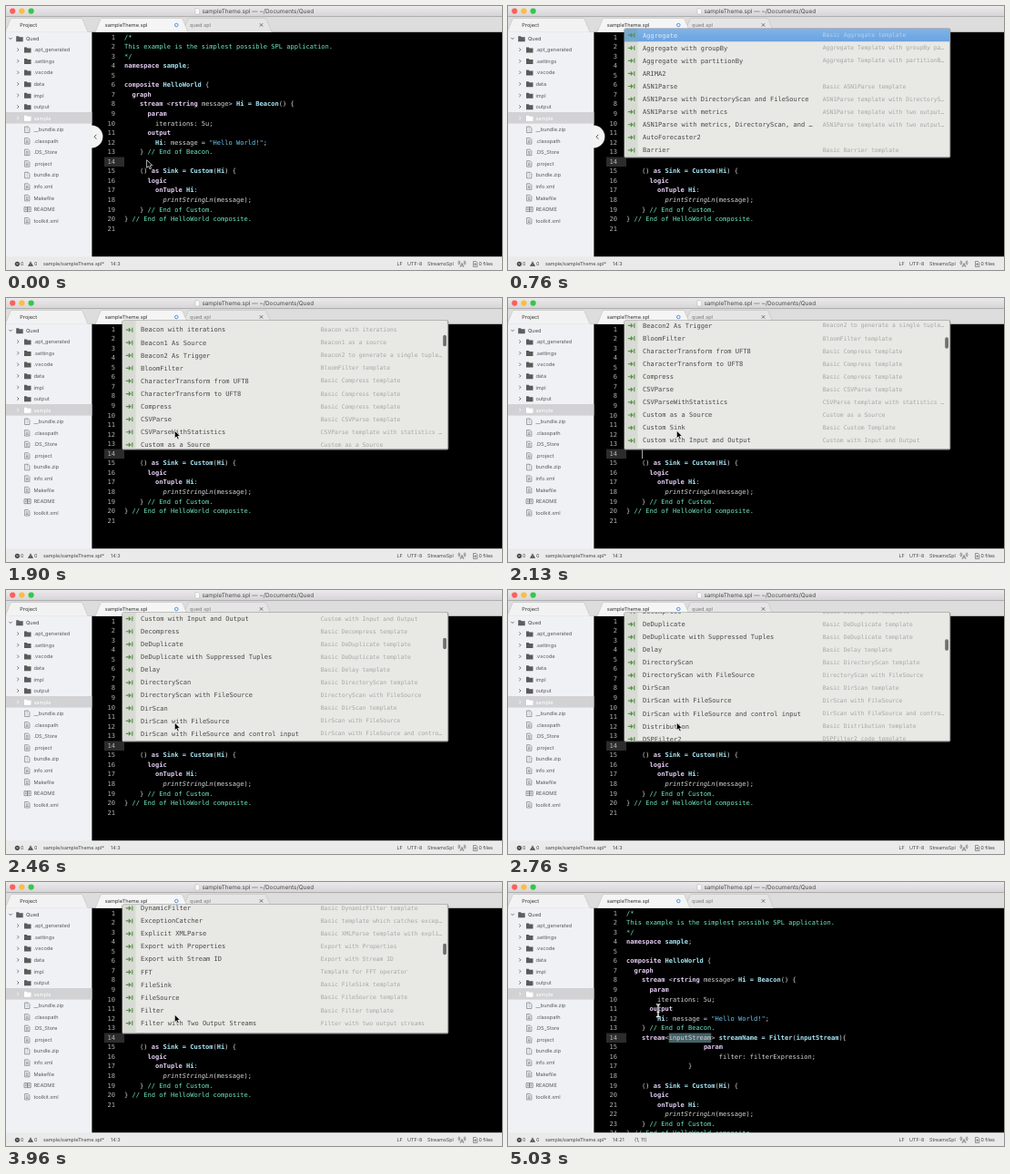
These frames come from a looping animation (545x291 px, 5160 ms). An HTML page:

```html
<!DOCTYPE html>
<html lang="en">
<head>
<meta charset="utf-8">
<title>Editor completion</title>
<style>
html, body { margin: 0; width: 100%; height: 100%; overflow: hidden; background: #000; }
svg { display: block; width: 100%; height: 100%; }
text { white-space: pre; text-rendering: geometricPrecision; font-family: Inter, Roboto, sans-serif; }
.mono { font-family: "DejaVu Sans Mono", "Noto Sans Mono", monospace; font-size: 7.05px; }
.small { font-size: 6.34px; }
.side { font-size: 5.65px; }
.tab { font-size: 5.65px; }
.status { font-size: 5.35px; }
.comment { fill: #6fe8c0; }
.string { fill: #74c8f0; }
.keyword { fill: #e4cdf2; font-weight: bold; }
.name { fill: #a8e6f4; font-weight: bold; }
.call { font-style: italic; }
</style>
</head>
<body>
<svg id="stage" viewBox="0 0 545 291" preserveAspectRatio="none">
  <defs>
    <linearGradient id="bar" x2="0" y2="1"><stop stop-color="#ebe9eb"/><stop offset="1" stop-color="#d6d4d6"/></linearGradient>
    <linearGradient id="pick" x2="0" y2="1"><stop stop-color="#80b3e8"/><stop offset="1" stop-color="#6aa3e0"/></linearGradient>
    <clipPath id="listClip"><rect x="128" y="25" width="357.5" height="141.5" rx="1.5"/></clipPath>
    <clipPath id="editorClip"><rect x="94" y="28" width="451" height="249"/></clipPath>
  </defs>
</svg>
<script>
const LOOP = 5160, CHAR = 4.244, LINE = 10.55, ROW = 14.08;
const stage = document.getElementById('stage');

function el(tag, attrs, parent = stage, text) {
  const node = document.createElementNS('http://www.w3.org/2000/svg', tag);
  for (const key in attrs) node.setAttribute(key, attrs[key]);
  if (text !== undefined) node.textContent = text;
  return parent.appendChild(node);
}
const group = (parent = stage, attrs = {}) => el('g', attrs, parent);
const rect = (x, y, width, height, fill, parent, more) => el('rect', { x, y, width, height, fill, ...more }, parent);
const path = (d, fill, parent, more) => el('path', { d, fill, ...more }, parent);
const line = (d, stroke, width, parent) => path(d, 'none', parent, { stroke, 'stroke-width': width });
const label = (x, y, text, cls, fill, parent, more) => el('text', { x, y, class: cls, fill, ...more }, parent, text);
const show = (node, on) => node.setAttribute('visibility', on ? 'visible' : 'hidden');

const before = `/*
This example is the simplest possible SPL application.
*/
namespace sample;

composite HelloWorld {
  graph
    stream <rstring message> Hi = Beacon() {
      param
        iterations: 5u;
      output
        Hi: message = "Hello World!";
    } // End of Beacon.`.split('\n');
const after = `
    () as Sink = Custom(Hi) {
      logic
        onTuple Hi:
          printStringLn(message);
    } // End of Custom.
} // End of HelloWorld composite.
`.split('\n');
const snippet = `    stream<inputStream> streamName = Filter(inputStream){
                    param
                        filter: filterExpression;
                }`.split('\n');

const TOKENS = /(?<comment>\/\/.*|\/\*|\*\/|^This.*)|(?<string>".*?")|(?<keyword>\b(?:namespace|composite|graph|stream|rstring|param|output|as|logic|onTuple)\b)|(?<name>\b(?:HelloWorld|Hi = Beacon|Hi|Sink = Custom|streamName = Filter|inputStream(?=\))|sample)\b)|(?<call>printStringLn)/g;

function codeLine(source, index, parent) {
  const y = 36.6 + index * LINE;
  label(120, y, index + 1, 'mono', '#b4b4b4', parent, { 'text-anchor': 'end' });
  const body = source.trimStart();
  const text = label(130 + (source.length - body.length) * CHAR, y, '', 'mono', '#d6d6d6', parent);
  let last = 0;
  for (const match of body.matchAll(TOKENS)) {
    el('tspan', {}, text, body.slice(last, match.index));
    const kind = Object.keys(match.groups).find(key => match.groups[key]);
    el('tspan', { class: kind }, text, match[0]);
    last = match.index + match[0].length;
  }
  el('tspan', {}, text, body.slice(last));
}

// Editor
rect(94, 28, 451, 249, '#000');
const editor = group(stage, { 'clip-path': 'url(#editorClip)' });
rect(108, 166.5, 22, 10.6, '#2c2c2c', editor);
const [common, plain, expanded] = [0, 1, 2].map(() => group(editor));
before.forEach((s, i) => codeLine(s, i, common));
after.forEach((s, i) => codeLine(s, i + 13, plain));
rect(176.7, 166.5, 46.6, 10.6, '#476168', expanded);
snippet.concat(after).forEach((s, i) => codeLine(s, i + 13, expanded));
const caret = rect(147, 166.3, 1, 10.7, '#a8a8a8', editor);
const endCaret = rect(222.7, 166.3, 1, 10.7, '#a8a8a8', editor);

// Title bar and tabs
rect(0, 0, 545, 11.5, 'url(#bar)');
['#fc605c', '#fdbc40', '#34c84a'].forEach((fill, i) => el('circle', { cx: 7.2 + i * 10.2, cy: 5.6, r: 3.1, fill }));
path('M208 2.7h3l1.6 1.6v4.7h-4.6z', '#fafafa', stage, { stroke: '#aaa', 'stroke-width': .4 });
label(215.4, 8, 'sampleTheme.spl — ~/Documents/Qued', '', '#4a4a4a', stage, { 'font-size': 6.42 });
rect(0, 11.5, 545, 17.3, '#dedddd');
line('M0 11.7H545', '#bcbcbc', .5);
function tab(left, right, fill) {
  path(`M${left - 6} 28.8 L${left} 14.5 Q${left + .5} 13.5 ${left + 2} 13.5 H${right - 2} Q${right - .5} 13.5 ${right} 14.5 L${right + 6} 28.8`,
    fill, stage, { stroke: '#b9b9b9', 'stroke-width': .5 });
}
tab(5, 84, '#f3f2f3');
tab(200, 286, '#e6e5e5');
tab(104, 194, '#f5f5f5');
label(15.3, 22.8, 'Project', 'tab', '#333');
label(108.8, 22.8, 'sampleTheme.spl', 'tab', '#333');
label(202, 22.8, 'qued.spl', 'tab', '#777');
el('circle', { cx: 187.3, cy: 21, r: 1.8, fill: 'none', stroke: '#3c8ee8', 'stroke-width': .9 });
line('M278.8 19.2l3.4 3.4m0-3.4l-3.4 3.4', '#555', .8);

// Sidebar
rect(0, 28.5, 94.4, 249, '#f0f1f5');
rect(0, 117, 94.4, 12.6, '#d2d2d4');
const folder = (x, y, fill) => path(`M${x} ${y - 2.8}h2.8l.7 1h4v5h-7.5z`, fill);
function fileIcon(x, y, name) {
  if (name === 'README') {
    line(`M${x} ${y - 2.5}h3.6v5h-3.6zm3.6 0h3.6v5h-3.6zm-2.7 1.5h1.8m-1.8 1.5h1.8m1.8-1.5h1.8m-1.8 1.5h1.8`, '#666', .6);
    return;
  }
  const inner = name.endsWith('zip') ? 'm2.7 .3v1m0 .8v1m0 .8v1' : 'm1.3 2.3h2.6m-2.6 1.4h2.6m-2.6 1.3h2.6';
  line(`M${x + .6} ${y - 3.2}h3.7l1.6 1.6v4.9h-5.3zv0${inner}`, '#666', .6);
}
const folders = '.apt_generated .settings .vscode data impl output sample'.split(' ');
const files = '__bundle.zip .classpath .DS_Store .project bundle.zip info.xml Makefile README toolkit.xml'.split(' ');
line('M3.3 34.9l1.7 1.7 1.7-1.7', '#555', .8);
folder(11.2, 36, '#5d5d5d');
label(22, 37.9, 'Qued', 'side', '#4a4a4a');
folders.concat(files).forEach((name, i) => {
  const y = 48.3 + i * 12.56;
  const tone = name === 'sample' ? '#fff' : '#5a5a5a';
  if (i < folders.length) {
    line(`M12.3 ${y - 1.8}l1.7 1.7-1.7 1.7`, tone, .8);
    folder(20, y, tone);
  } else fileIcon(20, y, name);
  label(30.4, y + 2, name, 'side', tone);
});
const toggle = group();
path('M94 131.6A12.4 12.4 0 0 1 94 156.4z', '#f4f3f4', toggle);
line('M99.3 141.8l-2.3 2.4 2.3 2.4', '#444', .9, toggle);

// Status bar
rect(0, 276.2, 545, 15, '#ebeaeb');
const status = (x, text) => label(x, 286.3, text, 'status', '#444');
el('circle', { cx: 12.4, cy: 284.3, r: 2.6, fill: '#444' });
line('M11.4 283.3l2 2m0-2l-2 2', '#ebeaeb', .6);
path('M27 281.6l3 5.2h-6z', '#444');
line('M27 283.3v1.5m0 .5v.7', '#ebeaeb', .6);
[[16, '0'], [31, '0'], [41, 'sample/sampleTheme.spl*'], [429.5, 'LF'], [441, 'UTF-8'], [463, 'StreamsSpl'], [519.5, '0 files']]
  .forEach(args => status(...args));
const position = status(115, '');
const selection = status(139, '(1, 11)');
line('M501 283.5l-2 4.5m2-4.5l2 4.5m-3.2-1.8h2.4M499 281.3q-1.2 1.7 0 3.4M503 281.3q1.2 1.7 0 3.4M497.8 280.6q-1.8 2.4 0 4.8M504.2 280.6q1.8 2.4 0 4.8', '#555', .6);
line('M513.5 281.5h3l1.3 1.3v4.6h-4.3zm2.1 1.7v3m-1.3-1.5h2.6', '#555', .6);

// Completion list
const items = `Aggregate|Basic Aggregate template
Aggregate with groupBy|Aggregate Template with groupBy pa…
Aggregate with partitionBy|Aggregate Template with partitionB…
ARIMA2|
ASN1Parse|Basic ASN1Parse template
ASN1Parse with DirectoryScan and FileSource|ASN1Parse template with DirectoryS…
ASN1Parse with metrics|ASN1Parse template with two output…
ASN1Parse with metrics, DirectoryScan, and …|ASN1Parse template with two output…
AutoForecaster2|
Barrier|Basic Barrier template
Beacon|Basic Beacon template
Beacon with iterations|Beacon with iterations
Beacon1 As Source|Beacon1 as a source
Beacon2 As Trigger|Beacon2 to generate a single tuple…
BloomFilter|BloomFilter template
CharacterTransform from UFT8|Basic Compress template
CharacterTransform to UFT8|Basic Compress template
Compress|Basic Compress template
CSVParse|Basic CSVParse template
CSVParseWithStatistics|CSVParse template with statistics …
Custom as a Source|Custom as a Source
Custom Sink|Basic Custom Template
Custom with Input and Output|Custom with Input and Output
Decompress|Basic Decompress template
DeDuplicate|Basic DeDuplicate template
DeDuplicate with Suppressed Tuples|Basic DeDuplicate template
Delay|Basic Delay template
DirectoryScan|Basic DirectoryScan template
DirectoryScan with FileSource|DirectoryScan with FileSource
DirScan|Basic DirScan template
DirScan with FileSource|DirScan with FileSource
DirScan with FileSource and control input|DirScan with FileSource and contro…
Distribution|Basic Distribution template
DSPFilter2|DSPFilter2 code template
DSPFilterFinite|DSPFilterFinite code template
DWT2|
DynamicFilter|Basic DynamicFilter template
ExceptionCatcher|Basic template which catches excep…
Explicit XMLParse|Basic XMLParse template with expli…
Export with Properties|Export with Properties
Export with Stream ID|Export with Stream ID
FFT|Template for FFT operator
FileSink|Basic FileSink template
FileSource|Basic FileSource template
Filter|Basic Filter template
Filter with Two Output Streams|Filter with two output streams
Format|Basic Format template`.split('\n').map(s => s.split('|'));

const popup = group();
rect(127.4, 24.4, 358.9, 143, '#8c8c8c', popup, { rx: 2 });
const clip = group(popup, { 'clip-path': 'url(#listClip)' });
rect(128, 25, 357.5, 141.5, '#e8e8e5', clip);
rect(128, 25, 14.5, 141.5, '#d8dbd3', clip);
const list = group(clip);
rect(128, 25, 357.5, 14.2, 'url(#pick)', list);
rect(128, 25, 14.5, 14.2, '#74a8d0', list);
items.forEach(([name, note], i) => {
  const y = 32.2 + i * ROW;
  line(`M131.8 ${y}h5m-2-2l2 2-2 2M138.8 ${y - 2.5}v5`, '#57904a', 1.2, list);
  label(148, y + 2.3, name, 'mono', i ? '#484848' : '#deebf8', list);
  label(345.8, y + 2, note, 'mono small', i ? '#a6a6a4' : '#b4d2f0', list);
});
const thumb = rect(480.2, 0, 3.7, 12.5, '#6f6f6f', clip, { rx: 1.85 });

// Pointers, drawn around their hot spot
const arrow = group();
path('M0 0V8.6L2 6.8 3.4 10 4.9 9.3 3.5 6.2H6.2z', '#000', arrow, { stroke: '#fff', 'stroke-width': .7 });
const beam = group(stage, { transform: 'translate(165 141.7)' });
const beamShape = 'M-2.2-7Q0-7 0-5.2Q0-7 2.2-7M0-5.4V5.4M-2.2 7Q0 7 0 5.2Q0 7 2.2 7M-1.5 1.6H1.5';
line(beamShape, '#333', 2.2, beam);
line(beamShape, '#fff', 1.1, beam);

// Each track is a list of [time, value]; values ease towards the next step.
const easeOut = p => 1 - (1 - p) ** 3;
const smooth = p => p * p * (3 - 2 * p);
const linear = p => p;
function track(steps, t, ease) {
  const next = steps.findIndex(step => step[0] > t);
  if (next === 0) return steps[0][1];
  if (next < 0) return steps[steps.length - 1][1];
  const [t0, a] = steps[next - 1], [t1, b] = steps[next];
  return a + (b - a) * ease((t - t0) / (t1 - t0));
}
const scroll = [[1670, 0], [2200, 185.2], [2215, 185.2], [2740, 332.4], [2765, 332.4], [3260, 482.1], [3290, 482.1], [3660, 510.2]];
const pointerX = [[1040, 154.6], [1430, 185.3], [4100, 185.3], [4530, 165]];
const pointerY = [[1040, 169.7], [1430, 146.1], [4100, 146.1], [4530, 141.5]];
const thumbFade = [[1690, 0], [1730, 1], [4130, 1], [4380, 0]];
const toggleFade = [[1060, 1], [1250, 0]];

function render(t) {
  const open = t >= 300 && t < 4730;
  const done = t >= 4730;
  const offset = track(scroll, t, easeOut);
  show(popup, open);
  show(plain, !done);
  show(expanded, done);
  show(selection, done);
  position.textContent = done ? '14:21' : '14:3';
  list.setAttribute('transform', `translate(0 ${-offset})`);
  thumb.setAttribute('y', 29.3 + offset * .0752);
  thumb.setAttribute('opacity', track(thumbFade, t, linear));
  toggle.setAttribute('opacity', track(toggleFade, t, linear));
  const blink = (t + 440) % 800;
  show(caret, !done && t >= 300 && (t < 760 || (blink >= 15 && blink < 400)));
  show(endCaret, done && t < 5030);
  show(arrow, !done && (t < 260 || t >= 1060));
  show(beam, done);
  arrow.setAttribute('transform', `translate(${track(pointerX, t, smooth)} ${track(pointerY, t, smooth)})`);
}

const start = performance.now();
function tick() {
  render((performance.now() - start) % LOOP);
  requestAnimationFrame(tick);
}
tick();
</script>
</body>
</html>
```
